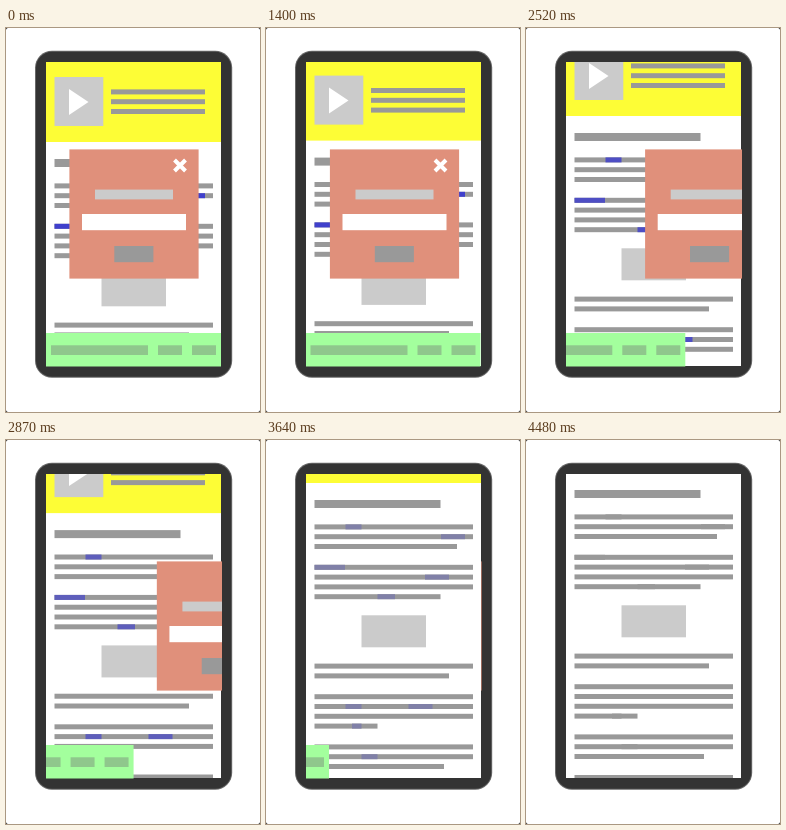
Animation, 254 px wide and 384 px high, one loop 6090 ms. Source, as an HTML page with a canvas:

```html
<!DOCTYPE html>
<html lang="en">
<head>
<meta charset="utf-8">
<title>Decluttered page</title>
<style>
  html, body { margin: 0; width: 100%; height: 100%; overflow: hidden; background: #fff; }
  canvas { display: block; width: 254px; height: 384px; }
</style>
</head>
<body>
<canvas id="stage" width="254" height="384"></canvas>
<script>
const canvas = document.getElementById('stage');
const ctx = canvas.getContext('2d');
const LOOP = 6090, STEP = 70;
const GRAY = '#999', LIGHT = '#cbcbcb';
const LEFT = 48.5, FULL = 207;

// Waypoints: time, sideways exit of the overlays, upward scroll
const PATH = [
  [1050, 0, 0], [1400, 0.5, 1.4], [1960, 16.2, 8], [2520, 55.7, 26],
  [3150, 113.2, 53], [3640, 152, 71], [4200, 174, 80.6], [4480, 175, 81]
];

// Paragraphs at their resting place: top, then the right end of each line
const PARAGRAPHS = [
  [74.4, FULL, FULL, 191],
  [114.8, FULL, FULL, FULL, 174.5],
  [213.6, FULL, 183],
  [244.2, FULL, FULL, FULL, 111.5],
  [294.4, FULL, FULL, 178],
  [335, FULL]
];

// Links: paragraph, line, left, right
const LINKS = [
  [0, 0, 79.5, 95.5], [0, 1, 175, 199],
  [1, 0, LEFT, 79], [1, 1, 159, 183], [1, 3, 111.5, 129],
  [3, 1, 79.5, 95.5], [3, 1, 142.5, 166.5], [3, 3, 86, 95.5],
  [4, 1, 95.5, 111.5]
];

function box(color, x1, y1, x2, y2) {
  ctx.fillStyle = color;
  ctx.fillRect(x1, y1, x2 - x1, y2 - y1);
}

function round(color, x, y, w, h, r) {
  ctx.fillStyle = color;
  ctx.beginPath();
  ctx.roundRect(x, y, w, h, r);
  ctx.fill();
}

function clipped(x1, y1, x2, y2, draw) {
  ctx.save();
  ctx.beginPath();
  ctx.rect(x1, y1, x2 - x1, y2 - y1);
  ctx.clip();
  draw();
  ctx.restore();
}

function slope(i, k) {
  if (i === 0 || i === PATH.length - 1) return 0;
  const a = PATH[i - 1], b = PATH[i + 1];
  return (b[k] - a[k]) / (b[0] - a[0]);
}

// Smooth cubic through the waypoints
function along(t, k) {
  const last = PATH.length - 1;
  if (t <= PATH[0][0]) return 0;
  if (t >= PATH[last][0]) return PATH[last][k];
  let i = 0;
  while (t >= PATH[i + 1][0]) i++;
  const a = PATH[i], b = PATH[i + 1], d = b[0] - a[0];
  const u = (t - a[0]) / d, v = 1 - u;
  return a[k] * v * v * (1 + 2 * u) + b[k] * u * u * (3 - 2 * u)
    + d * u * v * (slope(i, k) * v - slope(i + 1, k) * u);
}

function linkColor(t) {
  const u = Math.min(1, Math.max(0, (t - 2200) / 2000));
  const mix = (a, b) => Math.round(a + (b - a) * u);
  return `rgb(${mix(64, 153)},${mix(64, 153)},${mix(204, 153)})`;
}

function article(t) {
  const lineTop = (p, line) => PARAGRAPHS[p][0] + line * 9.8;
  box(GRAY, LEFT, 50, 174.5, 58);
  PARAGRAPHS.forEach(([, ...ends], p) => ends.forEach((end, line) => {
    const y = lineTop(p, line);
    box(GRAY, LEFT, y, end, y + 5);
  }));
  const color = linkColor(t);
  for (const [p, line, x1, x2] of LINKS) {
    const y = lineTop(p, line);
    box(color, x1, y, x2, y + 5);
  }
  box(LIGHT, 95.5, 165.3, 160, 197.3);
}

function banner() {
  box('#fdfd36', 40, 30, 215, 114);
  box(LIGHT, 48.5, 49, 97.3, 98);
  ctx.fillStyle = '#fff';
  ctx.beginPath();
  ctx.moveTo(63, 61);
  ctx.lineTo(82.5, 74);
  ctx.lineTo(63, 87);
  ctx.fill();
  for (let i = 0; i < 3; i++) {
    const y = 61.4 + i * 9.8;
    box(GRAY, 105, y, 199, y + 5);
  }
}

function popup() {
  box('#e0907b', 63.4, 121.4, 192.6, 250.6);
  box(LIGHT, 89, 161.6, 167, 171.4);
  box('#fff', 76, 186, 180, 202.2);
  box(GRAY, 108.3, 218, 147.4, 234.2);
  ctx.strokeStyle = '#fff';
  ctx.lineWidth = 4;
  ctx.beginPath();
  ctx.moveTo(168.5, 132);
  ctx.lineTo(179.5, 143);
  ctx.moveTo(179.5, 132);
  ctx.lineTo(168.5, 143);
  ctx.stroke();
}

function footer() {
  box('#a3ff9d', 40, 305, 215, 338.5);
  for (const [x1, x2] of [[45, 142], [152, 176], [186, 210]])
    box('#8fc78c', x1, 317.3, x2, 327);
}

function draw(t) {
  const away = along(t, 1), scroll = along(t, 2);
  ctx.clearRect(0, 0, 254, 384);
  box('#000', 0, 0, 254, 384);
  round('#fff', 0, 0, 254, 384, 2);
  round('#686868', 29, 22.8, 197.2, 327, 17);
  round('#333', 30, 23.8, 195.2, 325, 16);
  box('#fff', 40, 34, 215, 338);

  clipped(40, 34, 215, 338, () => {
    ctx.translate(0, 81 - scroll);
    article(t);
    ctx.translate(0, -81);
    banner();
  });
  clipped(40, 34, 216, 338, () => {
    ctx.translate(away, 0);
    popup();
  });
  clipped(40, 34, 215, 339, () => {
    ctx.translate(-away, 0);
    footer();
  });
}

const start = performance.now();
function tick() {
  const t = (performance.now() - start) % LOOP;
  draw(Math.floor(t / STEP) * STEP);
  requestAnimationFrame(tick);
}
tick();
</script>
</body>
</html>
```
